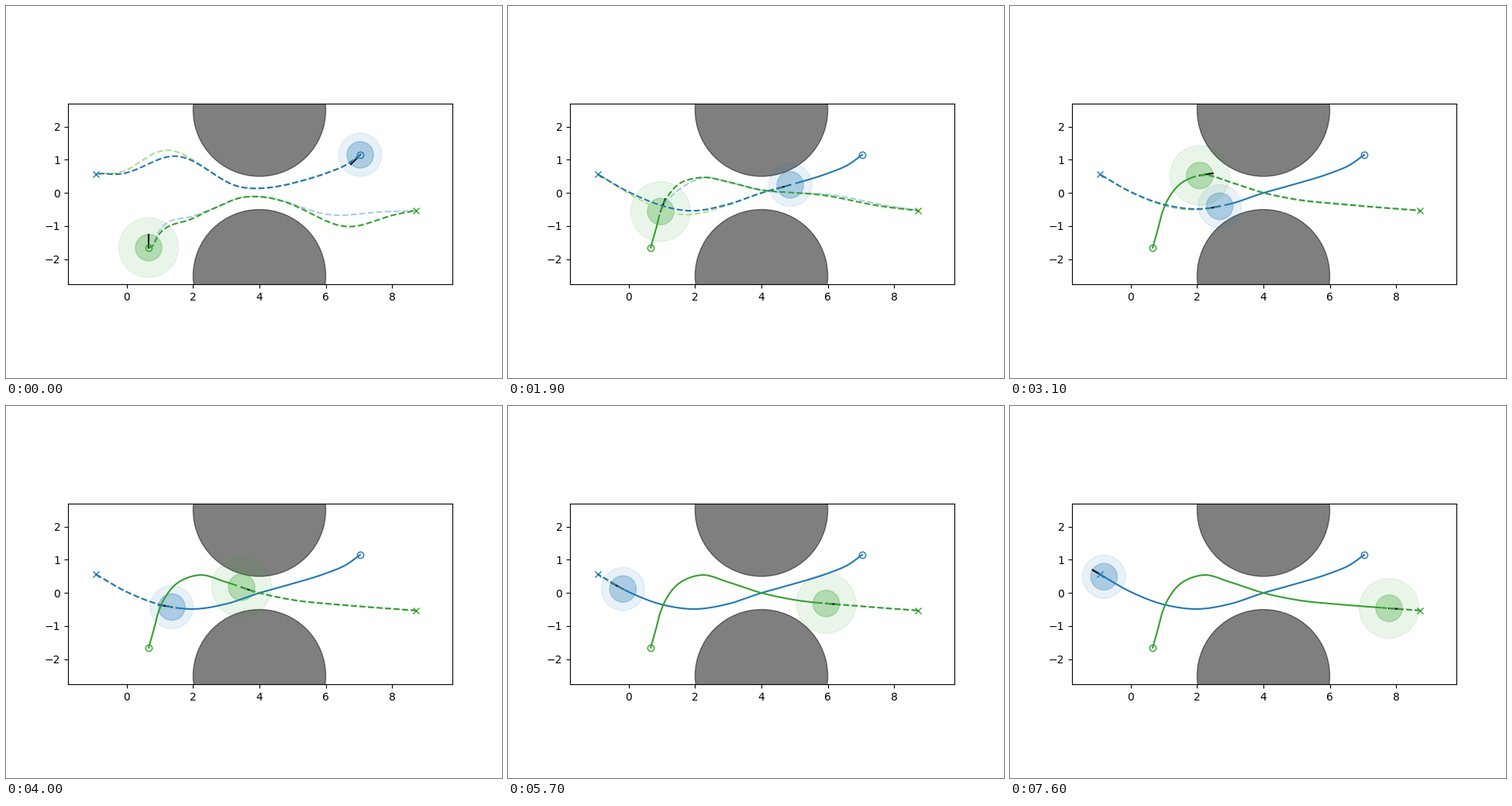
A matplotlib script that plays this animation: 640x480 px, repeating every 7700 ms.

```python
import numpy as np
import matplotlib.pyplot as plt
from matplotlib.animation import FuncAnimation

FRAMES, STEP = 77, 100
SCALE = 42.78  # pixels per unit
STOPS = [0, 0.5, 1.0, 1.9, 3.1, 5.0, 6.5, 7.6]
BLUE, LIGHT_BLUE = "#1f78b4", "#a6cee3"
GREEN, LIGHT_GREEN = "#33a02c", "#b2df8a"


def spline(xk, yk, x):
    """Cubic Hermite curve through the knots."""
    xk, yk = np.asarray(xk, float), np.asarray(yk, float)
    m = np.gradient(yk, xk)
    i = np.clip(np.searchsorted(xk, x, side="right") - 1, 0, len(xk) - 2)
    h = xk[i + 1] - xk[i]
    u = (x - xk[i]) / h
    return ((1 + 2 * u) * (1 - u) ** 2 * yk[i] + u * (1 - u) ** 2 * h * m[i]
            + u * u * (3 - 2 * u) * yk[i + 1] + u * u * (u - 1) * h * m[i + 1])


def ease(u):
    u = np.clip(u, 0, 1)
    return u * u * (3 - 2 * u)


def bumps(x, items):
    """Sum of bell curves, each given as height, centre, width."""
    return sum(h * np.exp(-((x - c) / w) ** 2) for h, c, w in items)


class Plan:
    """A detour from the final path: a first idea, then one that fades."""

    def __init__(self, first, second, start, span):
        self.first, self.second = first, second
        self.start, self.span = start, span

    def offset(self, x, t):
        w = ease(t / 0.6)
        fade = 1 - ease((t - self.start) / self.span)
        return (1 - w) * bumps(x, self.first) + w * fade * bumps(x, self.second)


class Robot:
    def __init__(self, ax, points, stops, plan, guess, heading, color,
                 guess_color, margin):
        self.plan, self.guess, self.heading = plan, guess, heading
        px, py = np.array(points).T
        chord = np.concatenate([[0], np.cumsum(np.hypot(np.diff(px), np.diff(py)))])
        k = np.linspace(0, chord[-1], 1500)
        self.xs, self.ys = spline(chord, px, k), spline(chord, py, k)
        steps = np.hypot(np.diff(self.xs), np.diff(self.ys))
        self.arc = np.concatenate([[0], np.cumsum(steps)])
        self.sign = np.sign(px[-1] - px[0])
        self.dist = np.interp(self.sign * np.array(stops),
                              self.sign * self.xs, self.arc)

        self.discs = [plt.Circle((0, 0), r, color=color, alpha=a)
                      for r, a in ((margin, 0.1), (0.4, 0.3))]
        for d in self.discs:
            ax.add_patch(d)
        self.nose, = ax.plot([], [], "k-", zorder=2)
        self.guess_line, = ax.plot([], [], "--", color=guess_color, zorder=2.1)
        self.trail, = ax.plot([], [], "-", color=color, zorder=2.2)
        self.plan_line, = ax.plot([], [], "--", color=color, zorder=2.3)
        for end, mark in ((0, "o"), (-1, "x")):
            ax.plot(px[end], py[end], mark, color=color, fillstyle="none",
                    zorder=2.4)

    def travelled(self, t):
        return np.clip(spline(STOPS, self.dist, t), 0, self.arc[-1])

    def at(self, s):
        return np.array([np.interp(s, self.arc, self.xs),
                         np.interp(s, self.arc, self.ys)])

    def ahead(self, plan, t, s):
        """The rest of the path with the detour, pinned at both ends."""
        x, y = self.at(np.linspace(s, self.arc[-1], 300))
        off = plan.offset(x, t)
        off = off - off[0] * np.exp(-5 * abs(x - x[0]))
        return x, y + off - off[-1] * np.exp(-5 * abs(x - x[-1]))

    def update(self, t):
        s = self.travelled(t)
        pos = self.at(s)
        for d in self.discs:
            d.center = tuple(pos)

        a, b = self.at(max(s - 0.02, 0)), self.at(min(s + 0.02, self.arc[-1]))
        angle = np.arctan2(*(b - a)[::-1])
        turn = (self.heading - angle + np.pi) % (2 * np.pi) - np.pi
        angle += turn * max(0, 1 - t / 0.8)
        tip = pos + 0.4 * np.array([np.cos(angle), np.sin(angle)])
        self.nose.set_data(*zip(pos, tip))

        self.plan_line.set_data(*self.ahead(self.plan, t, s))
        self.guess_line.set_data(*self.ahead(self.guess, t, s))
        # the trail lags one step behind
        done = self.arc < self.travelled(max(t - STEP / 1000, 0))
        self.trail.set_data(self.xs[done], self.ys[done])


fig = plt.figure(figsize=(6.4, 4.8), dpi=100)
ax = fig.add_subplot()
ax.set_aspect("equal")
left, mid = -1.774, -0.028
ax.set_xlim(left, left + 496 / SCALE)
ax.set_ylim(mid - 116.5 / SCALE, mid + 116.5 / SCALE)
ax.set_xticks(range(0, 9, 2))
ax.set_yticks(range(-2, 3))
for y in (2.5, -2.5):
    ax.add_patch(plt.Circle((4, y), 2, color="k", alpha=0.5))

over = [(1.56, 1.56, 1.57)]
blue = Robot(
    ax,
    points=[(7.04, 1.15), (6.6, 0.84), (6, 0.59), (5, 0.28), (4, 0),
            (3, -0.33), (2, -0.485), (1, -0.35), (0, 0.03), (-0.93, 0.56)],
    stops=[7.04, 6.89, 6.365, 4.87, 2.68, 0.30, -0.53, -0.81],
    plan=Plan(over, [(-0.16, 1.7, 1)], 0.7, 2),
    guess=Plan(over + [(0.24, 0.85, 0.85)], [(-0.21, 1.45, 1.2)], 1.5, 2.1),
    heading=-0.75 * np.pi, color=BLUE, guess_color=LIGHT_GREEN, margin=0.65)

under = [(-1.29, 1.85, 1.35), (-0.64, 6.6, 1.3)]
green = Robot(
    ax,
    points=[(0.66, -1.65), (0.8, -1.16), (0.96, -0.56), (1.15, -0.14),
            (1.5, 0.28), (2.2, 0.54), (3, 0.325), (4, 0), (5, -0.21),
            (6.6, -0.37), (8.72, -0.53)],
    stops=[0.66, 0.677, 0.726, 0.96, 2.08, 5.0, 6.89, 7.79],
    plan=Plan(under, [(-0.09, 2.2, 0.6), (0.3, 5.6, 1.6)], 1.4, 1.9),
    guess=Plan(under + [(0.14, 1.3, 0.8), (0.36, 6.85, 1.1)],
               [(-0.36, 1.4, 0.9), (0.5, 5.9, 1.7)], 0.5, 3),
    heading=np.pi / 2, color=GREEN, guess_color=LIGHT_BLUE, margin=0.9)


def draw(i):
    for robot in (blue, green):
        robot.update(i * STEP / 1000)
    return []


anim = FuncAnimation(fig, draw, frames=FRAMES, interval=STEP, repeat=True,
                     repeat_delay=0, blit=False)
plt.show()
```
